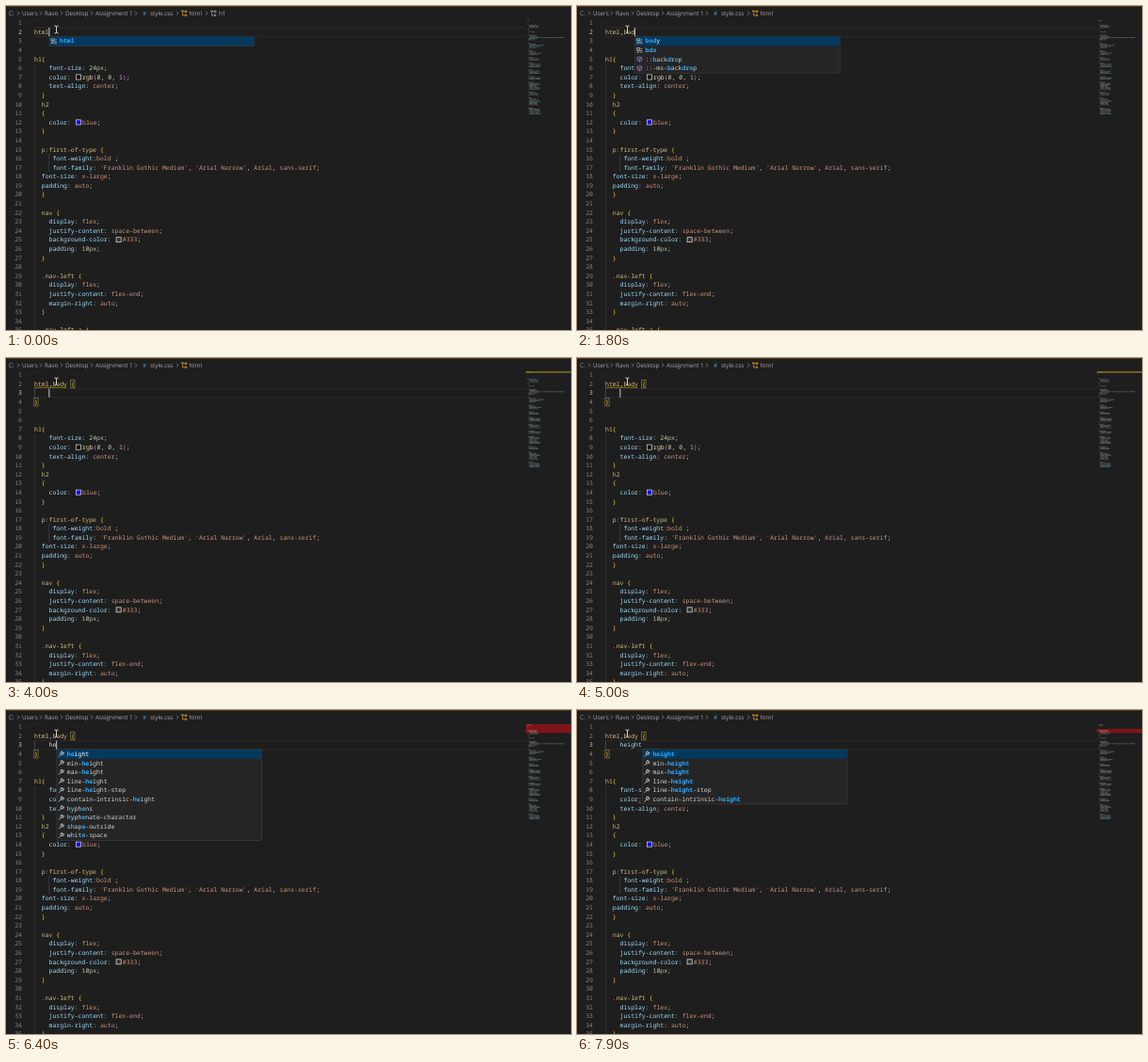
An HTML page with a canvas for the animation above (8000 ms loop, 600x344 px).

```html
<!DOCTYPE html>
<html lang="en">
<head>
<meta charset="utf-8">
<title>Editor</title>
<style>
html, body { margin: 0; width: 100%; height: 100%; overflow: hidden; background: #1e1e1e; }
canvas { display: block; }
</style>
</head>
<body>
<canvas id="stage" width="600" height="344"></canvas>
<script>
const ctx = document.getElementById('stage').getContext('2d');
const LOOP = 8000, LEFT = 30, CHAR = 3.888, ROW = 9.594;
const MONO = '6.48px "Noto Sans Mono", monospace';
const SANS = '6.3px "Open Sans", sans-serif';
const PLAIN = '#d4d4d4', SELECTOR = '#d7ba7d', PROP = '#9cdcfe', VALUE = '#ce9178',
      NUMBER = '#b5cea8', GOLD = '#ffd700', RED = '#f14c4c';

// Code below the rule being typed
const code = `h1{
    font-size: 24px;
    color: rgb(0, 0, 1);
    text-align: center;
  }
  h2
  {
    color: blue;
  }

  p:first-of-type {
     font-weight:bold ;
     font-family: 'Franklin Gothic Medium', 'Arial Narrow', Arial, sans-serif;
  font-size: x-large;
  padding: auto;
  }

  nav {
    display: flex;
    justify-content: space-between;
    background-color: #333;
    padding: 10px;
  }

  .nav-left {
    display: flex;
    justify-content: flex-end;
    margin-right: auto;
  }

  .nav-left a {`.split('\n');

// Rest of the file, only visible in the minimap
let seed = 7;
const random = () => (seed = seed * 16807 % 2147483647) / 2147483647;
const rest = [];
while (rest.length < 50) {
  const count = 2 + Math.floor(random() * 5);
  for (let i = 0; i < count; i++)
    rest.push('    ' + 'x'.repeat(6 + random() * 8) + ': ' + 'x'.repeat(4 + random() * 10));
  rest.push('  }', '', '  .' + 'x'.repeat(5 + random() * 9) + ' {');
}

// [time, text of the edited line]
const keys = [
  [-100, 'html'], [700, 'html,'], [800, 'html,b'], [1300, 'html,bo'], [1600, 'html,bod'],
  [2700, 'html,body'], [3200, 'html,body '], [3700, 'html,body {}'], [4000, '    '],
  [6000, '    h'], [6300, '    he'], [6500, '    hei'], [6800, '    heig'],
  [7000, '    heigh'], [7200, '    height']
];
const heights = 'height min-height max-height line-height line-height-step contain-intrinsic-height';
// [time, cursor column, matched letters, labels]
const popups = [
  [0, 4, 'html', 'html'], [400],
  [900, 6, 'b', 'b base bdi bdo blockquote body br button ::backdrop ::before :blank ::-ms-backdrop'],
  [1400, 7, 'bo', 'body blockquote button bdo ::backdrop ::before ::-ms-backdrop'],
  [1700, 8, 'bdo', 'body bdo ::backdrop ::-ms-backdrop'],
  [2800, 9, 'body', 'body'], [3200],
  [6100, 5, 'h', heights + ' hyphens hanging-punctuation hyphenate-character white-space text-shadow box-shadow'],
  [6400, 6, 'he', heights + ' hyphens hyphenate-character shape-outside white-space'],
  [6600, 7, 'hei', heights], [6900, 8, 'heig', heights],
  [7100, 9, 'heigh', heights], [7300, 10, 'height', heights]
];

const latest = (list, t) => list.filter(e => e[0] <= t).pop();
const colX = col => LEFT + col * CHAR;
const rowTop = n => 13.2 + (n - 1) * ROW;
const baseline = n => 20.2 + (n - 1) * ROW;

function text(s, x, y, color, font = MONO, weight = 500) {
  ctx.font = weight + ' ' + font;
  ctx.fillStyle = color;
  ctx.fillText(s, x, y);
}
function rect(x, y, w, h, color) {
  ctx.fillStyle = color;
  ctx.fillRect(x, y, w, h);
}
function path(d, x, y, color, width = .7) {
  ctx.save();
  ctx.translate(x, y);
  ctx.strokeStyle = color;
  ctx.lineWidth = width;
  ctx.stroke(new Path2D(d));
  ctx.restore();
}
function squiggle(n, col, count, color) {
  let d = 'M0 0';
  for (let x = 1; x <= count * CHAR; x++) d += `L${x} ${x % 2 ? -1 : 0}`;
  path(d, colX(col), baseline(n) + 2, color);
}

function tokens(s, x, y, pattern, colorOf) {
  for (const m of s.matchAll(pattern)) text(m[0], x + m.index * CHAR, y, colorOf(m[0]));
}
function valueColor(s) {
  if (/^\d/.test(s)) return NUMBER;
  if (/[()]/.test(s)) return '#da70d6';
  if (s === 'rgb') return '#dcdcaa';
  return /^[,;]/.test(s) ? PLAIN : VALUE;
}
function drawLine(s, n) {
  const y = baseline(n);
  const rule = s.match(/^(\s*)([\w-]+)(:\s*)(.+;)$/);
  if (!rule) {
    const color = c => /[{}]/.test(c) ? GOLD : c === ',' ? PLAIN : SELECTOR;
    tokens(s, LEFT, y, /[{},]|[^{},\s]+/g, color);
    return;
  }
  const [, indent, name, colon, value] = rule;
  let x = colX(indent.length);
  text(name, x, y, PROP);
  x += name.length * CHAR;
  text(':', x, y, PLAIN);
  x += colon.length * CHAR;
  if (name.endsWith('color')) {
    rect(x + 1.2, y - 5.2, 5.8, 5.8, '#e8e8e8');
    rect(x + 1.9, y - 4.5, 4.4, 4.4, value.slice(0, -1));
    x += 8.3;
  }
  tokens(value, x, y, /'[^']*'|\d+\w*|[(),;]|#?[\w-]+/g, valueColor);
}

function breadcrumbs(t) {
  const label = (s, x, color = '#a9a9a9') => text(s, x, 9.8, color, SANS, 400);
  const tree = (x, color) =>
    path('M0 1h2v-1h-2zM1 2v3h2M2 1h2M4 0h1.6v1.6h-1.6zM3.6 4h1.6v1.6h-1.6z', x, 5, color);
  label('C:', 3);
  label('Users', 17);
  label('Ravo', 41);
  label('Desktop', 63);
  label('Assignment 1', 95);
  label('#', 145, '#519aba');
  label('style.css', 153);
  tree(186.5, '#ee9d28');
  label('html', 194.5);
  const gaps = [12, 36, 58, 90, 137, 181];
  if (t < 900) {
    gaps.push(212);
    tree(217.5, '#a9a9a9');
    label('h1', 226);
  }
  for (const x of gaps) path('M0 0l2 2l-2 2', x, 5.6, '#a0a0a0', .7);
}

function minimap(lines, t) {
  if (t >= 4000 && t < 6000) rect(552, 14.3, 48, 1.4, '#8d7a22');
  if (t >= 6000) {
    const y = t < 6800 ? 15 : 20;
    rect(552, y, 48, 24.4 - y, '#7d1519');
    rect(555, 21.5, 9, 1, '#b8484c');
  }
  ctx.globalAlpha = .5;
  [...lines, ...rest].slice(0, 86).forEach((s, i) => {
    const color = /:.*;|: x/.test(s) ? '#87a5b0' : '#a3936d';
    for (const m of s.matchAll(/\S+/g))
      rect(553.5 + m.index * .5, 14 + i * 1.19, m[0].length * .5, .8, color);
  });
  ctx.globalAlpha = 1;
}

function icon(kind, x, y) {
  if (kind === 'pseudo')
    path('M0 -2.7L2.4 -1.4V1.4L0 2.7L-2.4 1.4V-1.4ZM-2.4 -1.4L0 -.1L2.4 -1.4M0 -.1V2.7', x, y, '#b180d7');
  else if (kind === 'property')
    path('M-2.6 2.6L.4 -.4M2.7 -1.6A1.7 1.7 0 1 1 1.2 -2.8L.9 -1.3Z', x, y, '#c5c5c5', .9);
  else
    path('M-3 -2.3H.4V-.5H-3ZM1.4 -1.4H3M-3 .8H3M-3 2.4H0M1 2.4H3', x, y, '#c5c5c5');
}

function drawPopup([, col, match, list], n) {
  const labels = list.split(' ');
  const x = colX(col) + .3, y = rowTop(n + 1) - .4, w = 218, h = labels.length * 9.6 + 1;
  rect(x, y, w, h, '#454545');
  rect(x + .5, y + .5, w - 1, h - 1, '#252526');
  rect(x + .5, y + .5, w - 1, 9.6, '#04395e');
  labels.forEach((label, row) => {
    const mid = y + 5.2 + row * 9.6;
    icon(label[0] === ':' ? 'pseudo' : n === 3 ? 'property' : 'tag', x + 5, mid);
    // "body" matches the letters in typed order
    const wanted = label === 'body' ? label.slice(0, match.length) : match;
    let hit = 0;
    [...label].forEach((c, i) => {
      const on = c === wanted[hit];
      if (on) hit++;
      const color = on ? '#2aaaff' : row ? PLAIN : '#fff';
      text(c, x + 11.2 + i * CHAR, mid + 2.3, color, MONO, on ? 700 : 500);
    });
  });
}

function bracketBox(n, col) {
  ctx.strokeStyle = '#858055';
  ctx.lineWidth = .7;
  ctx.strokeRect(colX(col) - .2, rowTop(n) + .5, CHAR + .4, ROW - 1);
}

function draw(t) {
  const [pressed, typed] = latest(keys, t);
  const opened = t >= 4000;
  const active = opened ? 3 : 2;
  const head = opened ? ['', 'html,body {', typed, '}', '', ''] : ['', typed, '', ''];
  const lines = [...head, ...code];
  const first = head.length + 1;

  rect(0, 0, 600, 344, '#1e1e1e');
  rect(0, 0, 600, 1, '#4d3d10');
  breadcrumbs(t);

  // Current line and indent guides
  rect(LEFT, rowTop(active) - .3, 522, .9, '#2b2b2b');
  rect(LEFT, rowTop(active + 1) - .6, 522, .9, '#2b2b2b');
  rect(LEFT, rowTop(first + 1), .6, 344, '#3a3a3a');
  rect(colX(4), rowTop(first + 11), .6, ROW * 2, '#4a4a4a');
  if (opened) rect(LEFT, rowTop(3), .6, ROW, '#606060');

  for (let n = 1; n <= 35; n++) {
    ctx.textAlign = 'right';
    text(n, 17, baseline(n), n === active ? '#c6c6c6' : '#858585');
    ctx.textAlign = 'left';
    const s = lines[n - 1];
    if (opened && n === 3) text(s, LEFT, baseline(n), s.endsWith('height') ? PROP : PLAIN);
    else drawLine(s, n);
  }

  if (opened) {
    bracketBox(2, 10);
    bracketBox(4, 0);
    if (t < 6000) squiggle(2, 0, 9, '#cca700');
    else {
      squiggle(8, 15, 4, RED);
      squiggle(9, 9, 1, RED);
      squiggle(10, 14, 1, RED);
    }
  } else if (t >= 3700) {
    bracketBox(2, 10);
    bracketBox(2, 11);
  }

  minimap(lines, t);

  if (Math.floor((t - pressed) / 500) % 2 === 0) {
    const col = typed.replace('}', '').length;
    rect(colX(col) - .2, rowTop(active) + .2, 1, ROW - .4, '#c8c8c8');
  }
  const popup = latest(popups, t);
  if (popup.length > 1) drawPopup(popup, active);

  const beam = 'M-2 -4Q0 -4 0 -3Q0 -4 2 -4M0 -3V3M-2 4Q0 4 0 3Q0 4 2 4';
  path(beam, 53.5, 25, '#111', 1.8);
  path(beam, 53.5, 25, '#f0f0f0', .9);
}

ctx.textRendering = 'geometricPrecision';
function frame() {
  draw(performance.now() % LOOP);
  requestAnimationFrame(frame);
}
frame();
</script>
</body>
</html>
```
